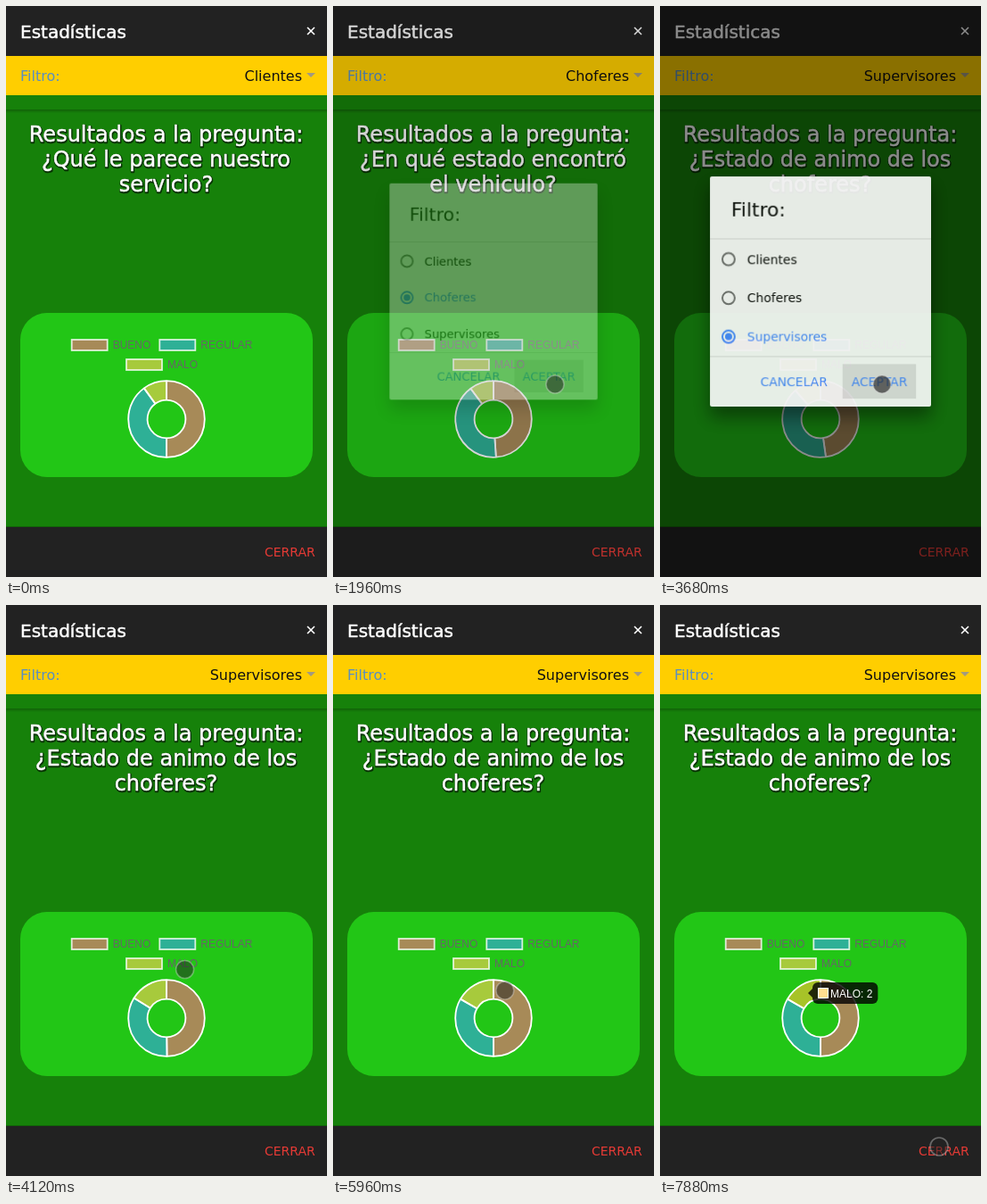
Animation, 360 px wide and 640 px high, one loop 7.92 s. Source, as an HTML page with a canvas:

```html
<!DOCTYPE html>
<html lang="es">
<head>
<meta charset="utf-8">
<title>Estadísticas</title>
<style>
html, body { margin: 0; width: 100%; height: 100%; overflow: hidden; background: #17810b; }
canvas { display: block; width: 360px; height: 640px; }
</style>
</head>
<body>
<canvas id="stage" width="360" height="640"></canvas>
<script>
const LOOP = 7920, W = 360, H = 640;
const stage = document.getElementById('stage').getContext('2d');
const layer = document.createElement('canvas');
layer.width = W;
layer.height = H;
const sheet = layer.getContext('2d');

const SANS = '"DejaVu Sans", sans-serif';
const ARIAL = '"Liberation Sans", Arial, sans-serif';
const BLUE = '#488aff';

const views = [
  { name: 'Clientes', votes: [5, 4, 1], lines: ['¿Qué le parece nuestro', 'servicio?'] },
  { name: 'Choferes', votes: [9, 8, 2], lines: ['¿En qué estado encontró', 'el vehiculo?'] },
  { name: 'Supervisores', votes: [6, 4, 2], lines: ['¿Estado de animo de los', 'choferes?'] }
];
const series = [
  { name: 'BUENO', rgb: '255,99,132', hover: '255,64,104', x: 73.7, y: 374 },
  { name: 'REGULAR', rgb: '54,162,235', hover: '5,157,255', x: 172.3, y: 374 },
  { name: 'MALO', rgb: '255,206,86', hover: '255,193,53', x: 135, y: 396 }
];
const dialogs = [
  { open: 840, pick: 1420, close: 1840, from: 0, to: 1 },
  { open: 2680, pick: 3180, close: 3640, from: 1, to: 2 }
];
const ripples = [720, 2600];
const hovers = [[6480, 0], [6880, 1], [7060, 2]];
const presses = [[700, 820], [1380, 1470], [1740, 1860], [2570, 2800],
  [3140, 3230], [3590, 3740], [6420, 6880]];
// Pointer stops: time, x, y
const path = [
  [240, 372, 112], [640, 308, 86], [900, 308, 86], [1200, 119, 306], [1360, 114, 327],
  [1480, 114, 327], [1720, 249, 424], [2000, 249, 424], [2480, 308, 86], [2820, 308, 86],
  [3060, 120, 371], [3260, 120, 371], [3520, 249, 424], [3840, 249, 424], [4480, 130, 386],
  [4920, 165, 402], [5300, 165, 402], [6300, 203, 443], [6850, 203, 443], [6930, 152, 474],
  [7000, 150, 468], [7080, 160, 433], [7480, 160, 433], [7840, 313, 607], [LOOP, 313, 607]
];

const clamp = v => Math.max(0, Math.min(1, v));
const smooth = p => p * p * (3 - 2 * p);
const outQuart = p => 1 - (1 - p) ** 4;
const mix = (a, b, p) => a + (b - a) * p;

// CSS ease-in-out: cubic-bezier(.42, 0, .58, 1)
function easeInOut(p) {
  let lo = 0, hi = 1;
  for (let i = 0; i < 20; i++) {
    const s = (lo + hi) / 2;
    const x = 1.26 * s * (1 - s) ** 2 + 1.74 * s * s * (1 - s) + s ** 3;
    if (x < p) lo = s; else hi = s;
  }
  return smooth(hi);
}

function text(c, str, x, y, size, color, align = 'left', family = SANS) {
  c.font = `${size}px ${family}`;
  c.textAlign = align;
  c.fillStyle = color;
  c.fillText(str, x, y);
}

function heavyText(c, str, x, y, size, color, align) {
  text(c, str, x, y, size, color, align);
  c.strokeStyle = color;
  c.lineWidth = 0.5;
  c.strokeText(str, x, y);
}

function box(c, x, y, w, h, color) {
  c.fillStyle = color;
  c.fillRect(x, y, w, h);
}

function disc(c, x, y, r, fill, line, width = 2) {
  c.beginPath();
  c.arc(x, y, r, 0, Math.PI * 2);
  if (fill) { c.fillStyle = fill; c.fill(); }
  if (line) { c.strokeStyle = line; c.lineWidth = width; c.stroke(); }
}

function rounded(c, x, y, w, h, r, color) {
  c.beginPath();
  c.roundRect(x, y, w, h, r);
  c.fillStyle = color;
  c.fill();
}

const viewAt = t => dialogs.filter(d => t >= d.close).length;

function drawBars(c, t, view) {
  box(c, 0, 0, W, H, '#16810a');
  const shade = c.createLinearGradient(0, 116, 0, 120);
  shade.addColorStop(0, 'rgba(0,0,0,.25)');
  shade.addColorStop(1, 'rgba(0,0,0,0)');
  box(c, 0, 116, W, 4, shade);

  box(c, 0, 0, W, 56, '#222');
  heavyText(c, 'Estadísticas', 16, 36, 20, '#fff', 'left');
  c.lineWidth = 1.6;
  c.beginPath();
  c.moveTo(338, 24); c.lineTo(346, 32);
  c.moveTo(346, 24); c.lineTo(338, 32);
  c.stroke();

  box(c, 0, 56, W, 44, '#ffce00');
  text(c, 'Filtro:', 16, 84, 16, '#5a8fc0');
  text(c, view.name, 332, 84, 16, '#111', 'right');
  c.beginPath();
  c.moveTo(337, 75); c.lineTo(347, 75); c.lineTo(342, 80);
  c.fillStyle = '#a29a80';
  c.fill();

  c.save();
  c.beginPath();
  c.rect(0, 56, W, 44);
  c.clip();
  for (const start of ripples) {
    const age = t - start;
    if (age < 0 || age > 500) continue;
    const alpha = 0.2 * (1 - clamp((age - 200) / 300));
    disc(c, 308, 86, Math.min(70, age * 0.225), `rgba(0,0,0,${alpha})`);
  }
  c.restore();

  box(c, 0, 584, W, 56, '#222');
  box(c, 0, 583, W, 1, 'rgba(0,0,0,.2)');
  text(c, 'CERRAR', 290, 617, 14, '#e53a35');
}

function drawTitle(c, view) {
  c.lineJoin = 'round';
  ['Resultados a la pregunta:', ...view.lines].forEach((line, i) => {
    const y = 152 + i * 28;
    c.font = `24px ${SANS}`;
    c.textAlign = 'center';
    c.strokeStyle = 'rgba(0,0,0,.6)';
    c.lineWidth = 2.4;
    c.strokeText(line, 180, y + 0.5);
    heavyText(c, line, 179.5, y, 24, '#fff', 'center');
  });
}

function sharesAt(t) {
  const shares = i => {
    const total = views[i].votes.reduce((a, b) => a + b);
    return views[i].votes.map(v => v / total);
  };
  const now = viewAt(t);
  if (!now) return shares(0);
  const p = outQuart(clamp((t - dialogs[now - 1].close) / 1000));
  const before = shares(now - 1);
  return shares(now).map((s, i) => mix(before[i], s, p));
}

function drawChart(c, t, active) {
  rounded(c, 16, 344, 328, 184, 30, '#22c616');
  c.lineWidth = 1.8;
  c.lineJoin = 'miter';
  c.strokeStyle = 'rgba(255,255,255,.8)';
  for (const s of series) {
    box(c, s.x, s.y, 40, 12, `rgba(${s.rgb},.6)`);
    c.strokeRect(s.x, s.y, 40, 12);
    text(c, s.name, s.x + 46, s.y + 10, 12, '#666', 'left', ARIAL);
  }
  let angle = -Math.PI / 2;
  c.strokeStyle = '#fff';
  c.lineJoin = 'bevel';
  sharesAt(t).forEach((share, i) => {
    const end = angle + share * Math.PI * 2;
    c.beginPath();
    c.arc(180, 463, 42.8, angle, end);
    c.arc(180, 463, 21.4, end, angle, true);
    c.closePath();
    c.fillStyle = `rgba(${i === active ? series[i].hover : series[i].rgb},.6)`;
    c.fill();
    c.stroke();
    angle = end;
  });
}

function tipBox(c, i) {
  const label = `${series[i].name}: ${views[2].votes[i]}`;
  c.font = `12px ${ARIAL}`;
  const w = c.measureText(label).width + 26;
  const [x, y] = [[205 - w, 463], [159, 479], [171, 435]][i];
  return { label, w, x, y };
}

function drawTip(c, t) {
  const k = hovers.filter(h => t >= h[0]).length - 1;
  if (k < 0) return;
  const [start, i] = hovers[k];
  const p = outQuart(clamp((t - start) / 400));
  const tip = tipBox(c, i);
  let { x, y, w } = tip;
  if (k) {
    const last = tipBox(c, hovers[k - 1][1]);
    x = mix(last.x, x, p);
    y = mix(last.y, y, p);
    w = mix(last.w, w, p);
  }
  c.save();
  c.globalAlpha = k ? 1 : p;
  c.fillStyle = 'rgba(0,0,0,.8)';
  const edge = i ? x : x + w, tipX = i ? x - 5 : x + w + 5;
  c.beginPath();
  c.roundRect(x, y - 12, w, 24, 6);
  c.fill();
  c.beginPath();
  c.moveTo(edge, y - 5);
  c.lineTo(tipX, y);
  c.lineTo(edge, y + 5);
  c.fill();
  box(c, x + 6, y - 6, 12, 12, '#fff');
  box(c, x + 7, y - 5, 10, 10, `rgba(${series[i].rgb},.65)`);
  text(c, tip.label, x + 20, y + 4.5, 12, '#fff', 'left', ARIAL);
  c.restore();
}

function paintDialog(c, d, t) {
  c.clearRect(0, 0, W, H);
  c.save();
  c.shadowColor = 'rgba(0,0,0,.45)';
  c.shadowBlur = 20;
  c.shadowOffsetY = 12;
  rounded(c, 55, 190, 250, 260, 2, '#fafafa');
  c.restore();
  text(c, 'Filtro:', 79, 235, 22, '#111');
  box(c, 55, 260, 250, 1, '#dadada');
  box(c, 55, 393, 250, 1, '#dadada');
  const chosen = t >= d.pick ? d.to : d.from;
  views.forEach((v, i) => {
    const y = 283.5 + i * 43.8, on = i === chosen;
    disc(c, 76, y, 7, null, on ? BLUE : '#737373');
    if (on) disc(c, 76, y, 4, BLUE);
    text(c, v.name, 97, Math.round(y + 5), 14, on ? BLUE : '#111');
  });
  const press = clamp((t - d.close + 120) / 100);
  if (press) box(c, 205, 402, 83, 39, `rgba(140,140,140,${0.24 * press})`);
  text(c, 'CANCELAR', 112, 427, 14, BLUE);
  text(c, 'ACEPTAR', 215, 427, 14, BLUE);
}

function drawDialog(c, t) {
  const d = dialogs.find(o => t >= o.open && t < o.close + 200);
  if (!d) return;
  const enter = easeInOut(clamp((t - d.open) / 200));
  const leave = easeInOut(clamp((t - d.close) / 200));
  const alpha = enter * (1 - leave);
  const scale = 1.1 - 0.1 * enter - 0.1 * leave;
  box(c, 0, 0, W, H, `rgba(0,0,0,${0.5 * alpha})`);
  paintDialog(sheet, d, t);
  c.save();
  c.globalAlpha = alpha;
  c.translate(180, 320);
  c.scale(scale, scale);
  c.drawImage(layer, -180, -320);
  c.restore();
}

function drawPointer(c, t) {
  const n = path.findIndex(stop => stop[0] > t);
  if (n < 1) return;
  const [a, b] = [path[n - 1], path[n]];
  const p = smooth((t - a[0]) / (b[0] - a[0]));
  const down = presses.some(([from, to]) => t >= from && t < to);
  disc(c, mix(a[1], b[1], p), mix(a[2], b[2], p), 10,
    `rgba(35,35,35,${down ? 0.65 : 0.52})`, 'rgba(215,215,215,.4)', 1.6);
}

function draw(t) {
  const view = views[viewAt(t)];
  const hover = hovers.filter(h => t >= h[0]).pop();
  drawBars(stage, t, view);
  drawTitle(stage, view);
  drawChart(stage, t, hover ? hover[1] : -1);
  drawTip(stage, t);
  drawDialog(stage, t);
  drawPointer(stage, t);
}

const begin = performance.now();
function tick() {
  const t = (performance.now() - begin) % LOOP;
  draw(Math.floor(t / 40) * 40);
  requestAnimationFrame(tick);
}
tick();
</script>
</body>
</html>
```
